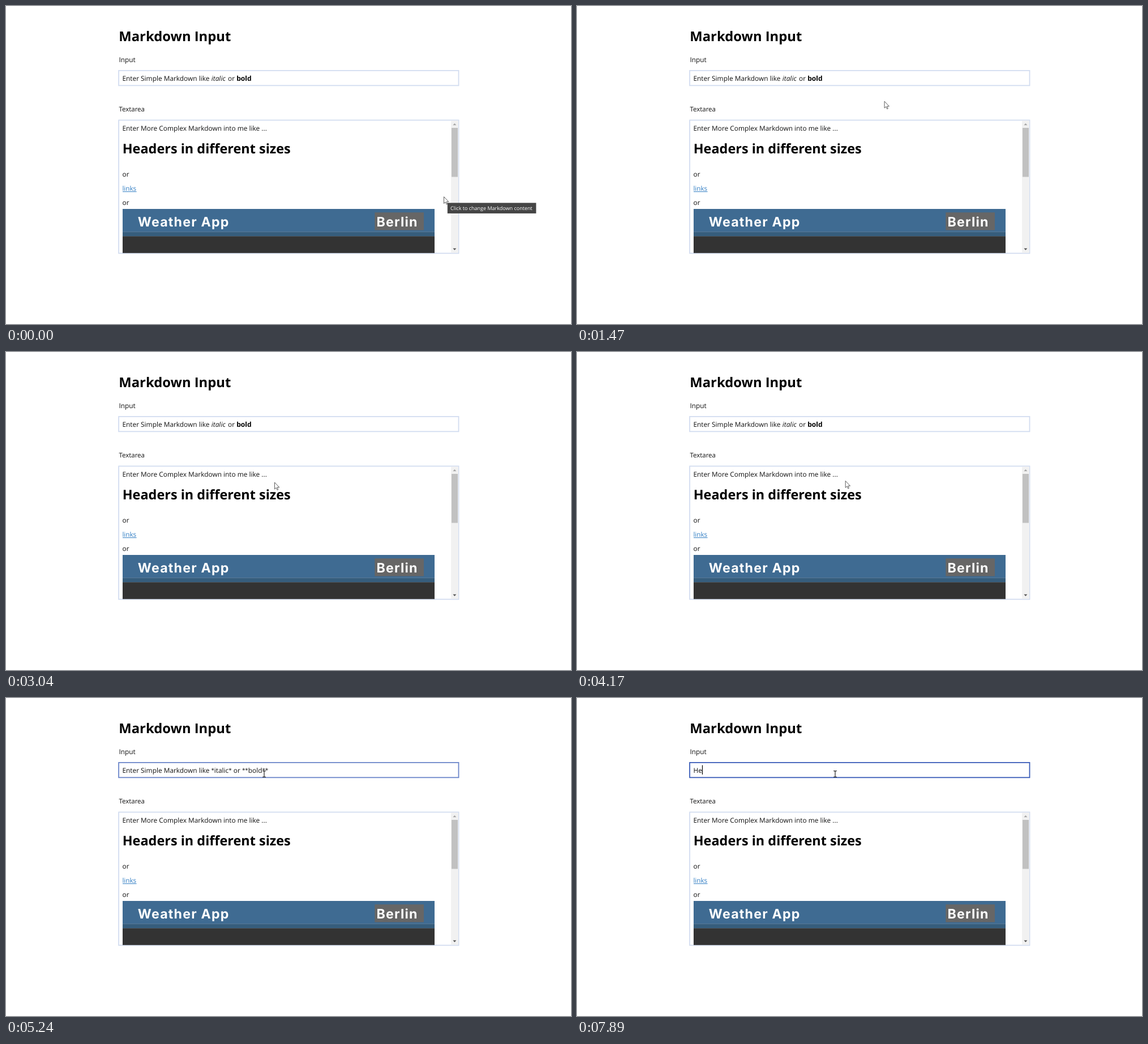
An HTML page for the animation above (8000 ms loop, 998 by 561 pixels).

```html
<!DOCTYPE html>
<html lang="en">
<head>
<meta charset="utf-8">
<title>Markdown Input</title>
<style>
  html, body { margin: 0; width: 100%; height: 100%; overflow: hidden; background: #fff; }
  svg { display: block; width: 998px; height: 561px; }
  text { font: 11.88px "Open Sans", "Noto Sans", sans-serif; fill: #111; white-space: pre; text-rendering: geometricPrecision; }
  .h1 { font-size: 23.8px; font-weight: 700; fill: #000; }
  .h2 { font-size: 23.45px; font-weight: 700; fill: #000; }
  .bold { font-size: 12.1px; font-weight: 700; fill: #000; }
  .italic { font-style: italic; }
  .star { font-size: 9.8px; baseline-shift: 1.2px; }
  .banner { font: 700 23.2px Inter, sans-serif; letter-spacing: 1.2px; fill: #fff; }
  .tip { font-size: 9.02px; fill: #fff; }
  .frame { fill: #fff; stroke: #d3ddf0; stroke-width: 1.8; }
</style>
</head>
<body>
<svg viewBox="0 0 998 561">
  <text class="h1" x="199.3" y="62">Markdown Input</text>
  <text x="199.4" y="98.7">Input</text>
  <rect id="field" class="frame" x="199.1" y="113.9" width="600.4" height="26.4"/>
  <g id="preview">
    <text x="205.4" y="132">Enter Simple Markdown like </text>
    <text class="italic" x="362.8" y="132">italic</text>
    <text x="392" y="132">or</text>
    <text class="bold" x="407.2" y="132">bold</text>
  </g>
  <g id="editor">
    <rect id="selection" x="206" y="118" width="258" height="17" fill="#0078d7"/>
    <text id="source" x="205.4" y="132">Enter Simple Markdown like <tspan class="star">*</tspan>italic<tspan class="star">*</tspan> or <tspan class="star">**</tspan>bold<tspan class="star">**</tspan></text>
    <text id="typed" x="205.4" y="132"></text>
    <rect id="caret" y="118.5" width="1.2" height="16.5"/>
  </g>

  <text x="199.4" y="186" style="font-size:11.5px">Textarea</text>
  <rect class="frame" x="199.1" y="201.4" width="600.4" height="234.9"/>
  <text x="205.4" y="219.5">Enter More Complex Markdown into me like ...</text>
  <text class="h2" x="205.7" y="260">Headers in different sizes</text>
  <text x="205.6" y="301">or</text>
  <text x="205.4" y="326" style="font-size:11.7px;fill:#337fc4">links</text>
  <path d="M206 327.6H230.6" stroke="#337fc4"/>
  <text x="205.6" y="351">or</text>

  <rect x="206" y="358" width="551" height="40.6" fill="#3f6b92"/>
  <rect x="206" y="398.4" width="551" height="8" fill="#365d7c"/>
  <rect x="206" y="406.2" width="551" height="29.6" fill="#333"/>
  <rect x="651.3" y="364.2" width="86.7" height="31.3" fill="#666"/>
  <text class="banner" x="232.8" y="389">Weather App</text>
  <text class="banner" x="654.4" y="389">Berlin</text>

  <rect x="786" y="202.3" width="12.8" height="233" fill="#f1f1f1"/>
  <rect x="787" y="215" width="11" height="86.5" fill="#c1c1c1"/>
  <path d="M789.4 210.2h6l-3-3.2z" fill="#a3a3a3"/>
  <path d="M789.4 427.6h6l-3 3.2z" fill="#505050"/>

  <g id="tooltip">
    <rect x=".3" y=".3" width="156.6" height="18.6" fill="#454545"/>
    <text class="tip" x="5.6" y="13.4">Click to change Markdown content</text>
  </g>
  <path id="arrow" d="M.5 .5V12.4L3.2 9.9 5.1 14 6.8 13.2 5 9.3H8.8Z" fill="#fff" stroke="#333" stroke-width=".8"/>
  <path id="beam" d="M453.2 128.6H455L456 129.4 457 128.6H458.8M456 129.4V138.6M453.2 139.4H455L456 138.6 457 139.4H458.8" fill="none" stroke="#222" stroke-width="1.2"/>
</svg>
<script>
const LOOP = 8000;
const $ = id => document.getElementById(id);
const show = (id, on) => $(id).style.display = on ? '' : 'none';
const within = (t, from, to) => t >= from && t < to;
const mix = (a, b, p) => a + (b - a) * p;

const easeIn = p => p ** 1.3;
const easeOut = p => 1 - (1 - p) ** 2.5;
const smooth = p => p * p * (3 - 2 * p);
const linear = p => p;

// Pointer stops: time, x, y, easing used to reach the stop
const stops = [
  [0, 773, 336, linear],
  [1085, 773, 336, linear],
  [1470, 543, 168, easeIn],
  [1800, 487, 122.5, easeOut],
  [1890, 484, 124, linear],
  [1990, 484, 126, linear],
  [2445, 484, 126, linear],
  [3040, 474, 229.5, smooth],
  [4145, 474, 229.5, linear],
  [4500, 464.8, 152.5, easeIn],
  [4790, 454, 133, easeOut],
  [LOOP, 454, 133, linear]
];

function pointerAt(t) {
  const i = stops.findIndex(s => s[0] > t);
  const [t0, x0, y0] = stops[i - 1], [t1, x1, y1, ease] = stops[i];
  const p = ease((t - t0) / (t1 - t0));
  return [mix(x0, x1, p), mix(y0, y1, p)];
}

function borderAt(t) {
  const p = Math.min(1, Math.max(0, (t - 5010) / 440));
  const k = 1 - (1 - p) ** 1.5;
  const from = [211, 221, 240], to = [58, 92, 184];
  return `rgb(${from.map((c, i) => Math.round(mix(c, to[i], k)))})`;
}

function draw(t) {
  const editing = t >= 5010;
  const [x, y] = pointerAt(t);

  show('arrow', !editing);
  show('beam', editing);
  $('arrow').setAttribute('transform', `translate(${x} ${y})`);

  show('tooltip', t < 20 || within(t, 2190, 2470) || within(t, 3230, 4170));
  $('tooltip').setAttribute('transform', `translate(${Math.round(x) + 6.5} ${Math.round(y) + 11})`);

  $('field').style.stroke = borderAt(t);
  show('preview', !editing);
  show('editor', editing);

  const selected = within(t, 6660, 7150);
  show('selection', selected);
  show('source', t < 7150);
  $('source').style.fill = selected ? '#fff' : '#111';

  const typed = t < 7840 ? '' : t < 7890 ? 'H' : 'He';
  $('typed').textContent = typed;
  $('caret').setAttribute('x', [206, 214.6, 220.9][typed.length]);
  show('caret', within(t, 5270, 5800) || within(t, 6320, 6660) || within(t, 7150, 7670) || t >= 7840);
}

const start = performance.now();
function tick() {
  draw((performance.now() - start) % LOOP);
  requestAnimationFrame(tick);
}
tick();
</script>
</body>
</html>
```
